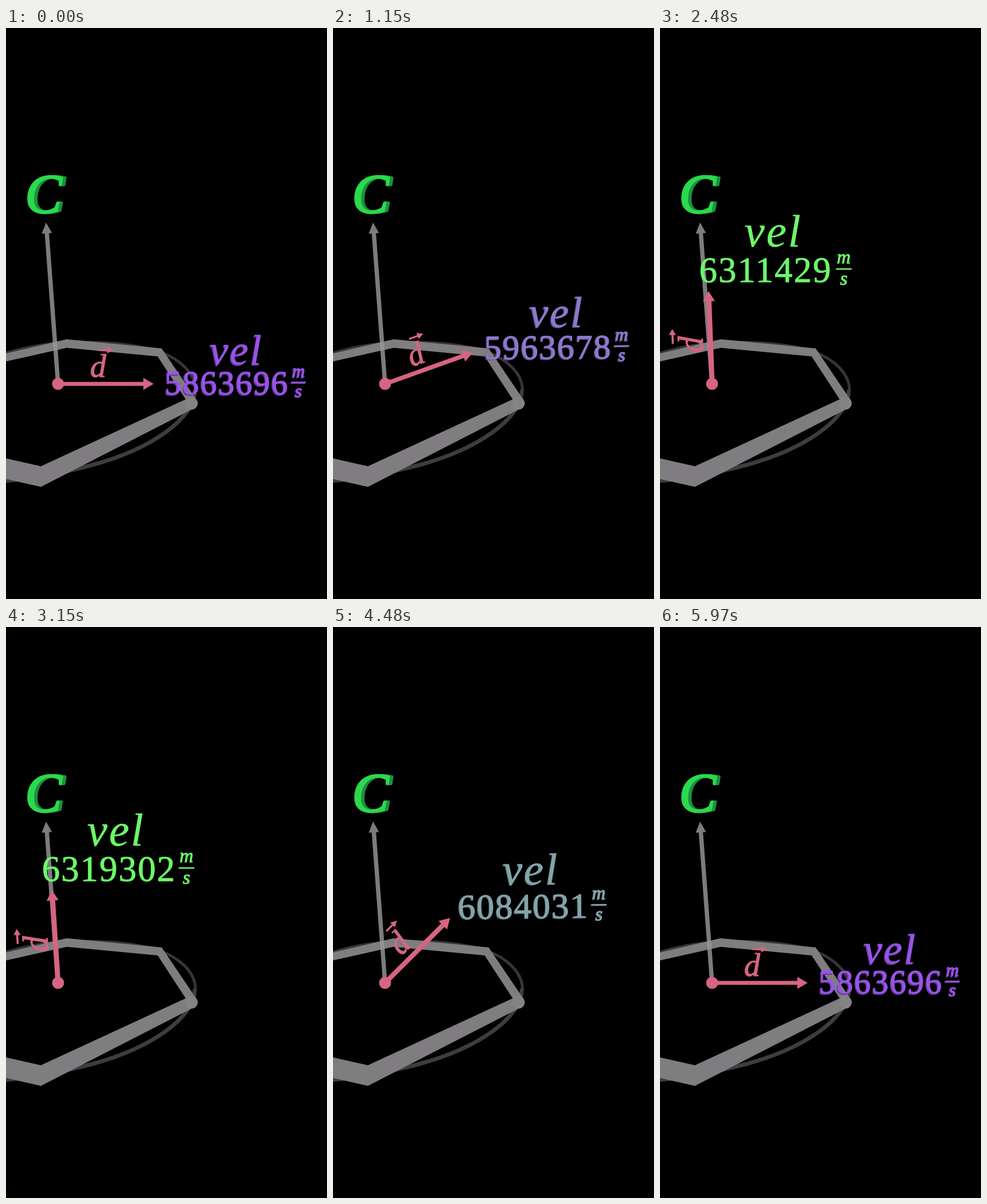
These frames come from a looping animation (561 px wide and 998 px high, 6000 ms). An HTML page with a canvas:

```html
<!DOCTYPE html>
<html lang="en">
<head>
<meta charset="utf-8">
<title>Velocity and direction</title>
<style>
html, body { margin: 0; width: 100%; height: 100%; overflow: hidden; background: #000; }
canvas { display: block; width: 100vw; height: 100vh; }
</style>
</head>
<body>
<canvas id="stage" width="561" height="998"></canvas>
<script>
const ctx = document.getElementById('stage').getContext('2d');
const LOOP = 6000, STEPS = 198;
const O = { x: 91, y: 622 };
const SERIF = '"Liberation Serif", "Times New Roman", serif';
const PINK = '#d56581', GRAY = '#7f7d80';
const PURPLE = [152, 84, 232], GREEN = [108, 250, 104];
const LOW = 5863696, HIGH = 6319726;

// Cubic ease in and out, and its inverse
const ease = p => p < .5 ? 4 * p ** 3 : 1 - 4 * (1 - p) ** 3;
const unease = e => e < .5 ? Math.cbrt(e / 4) : 1 - Math.cbrt((1 - e) / 4);
const mix = (a, b, k) => a + (b - a) * k;

// Step number and speed; progress runs evenly between keys
const keys = [
  [1, LOW], [38, 5963678], [64, 6240111], [98, HIGH],
  [104, 6319302], [130, 6257579], [166, 5919538], [197, LOW]
].map(([n, v]) => [n, unease((v - LOW) / (HIGH - LOW))]);

function progress(n) {
  if (n <= keys[0][0]) return 0;
  for (let i = 1; i < keys.length; i++) {
    const [n0, p0] = keys[i - 1], [n1, p1] = keys[i];
    if (n <= n1) return mix(p0, p1, (n - n0) / (n1 - n0));
  }
  return 0;
}

function poly(points, fill) {
  ctx.beginPath();
  points.forEach(([x, y]) => ctx.lineTo(x, y));
  ctx.closePath();
  ctx.fillStyle = fill;
  ctx.fill();
}

function disc(x, y, r, fill) {
  ctx.beginPath();
  ctx.arc(x, y, r, 0, 7);
  ctx.fillStyle = fill;
  ctx.fill();
}

function text(str, x, y, size, style, weight) {
  ctx.font = `${style} ${size}px ${SERIF}`;
  ctx.lineWidth = weight;
  ctx.lineJoin = 'round';
  ctx.fillText(str, x, y);
  ctx.strokeText(str, x, y);
}

function ink(color) {
  ctx.fillStyle = ctx.strokeStyle = color;
}

function arrow(x0, y0, x1, y1, wide, headLen, headWide, color) {
  const len = Math.hypot(x1 - x0, y1 - y0), neck = len - headLen;
  ctx.save();
  ctx.translate(x0, y0);
  ctx.rotate(Math.atan2(y1 - y0, x1 - x0));
  poly([[0, -wide / 2], [neck, -wide / 2], [neck, -headWide / 2], [len, 0],
    [neck, headWide / 2], [neck, wide / 2], [0, wide / 2]], color);
  ctx.restore();
}

function drawRing() {
  ctx.strokeStyle = '#363537';
  ctx.lineWidth = 5;
  ctx.beginPath();
  ctx.moveTo(-5, 570);
  ctx.bezierCurveTo(30, 559, 60, 553, 106, 550);
  ctx.bezierCurveTo(170, 547, 230, 553, 269, 566);
  ctx.bezierCurveTo(305, 579, 332, 605, 331, 634);
  ctx.stroke();
  ctx.strokeStyle = '#3d3c3e';
  ctx.lineWidth = 7;
  ctx.beginPath();
  ctx.moveTo(330, 632);
  ctx.bezierCurveTo(331, 682, 254, 736, 150, 764);
  ctx.bezierCurveTo(100, 777, 50, 787, -5, 792);
  ctx.stroke();

  poly([[-5, 570], [106, 544], [272, 560], [333, 650], [335, 657], [330, 664],
    [61, 802], [-5, 787], [-5, 751], [61, 766], [314, 649], [265, 574],
    [106, 559], [-5, 584]], GRAY);
  disc(324, 656, 11, '#858386');
}

function drawC() {
  for (let i = 6; i >= 0; i--) {
    ink(i ? '#1c9140' : '#2bd94c');
    text('C', 33 + i, 323, 97, 'italic', 2.5);
  }
}

function drawPointer(sin, cos) {
  const tx = 167 * cos - 11 * sin;
  const ty = -162 * sin - 12 * sin ** 4 * cos;
  arrow(O.x, O.y, O.x + tx, O.y + ty, mix(7, 9, sin), 18, 21, PINK);
  disc(O.x, O.y, 10.5, PINK);

  // The label lies in the plane in which the pointer turns
  ctx.save();
  ctx.transform(tx / 167, ty / 167, 66 / 59 * sin, cos, O.x, O.y);
  ink(PINK);
  text('d', 56, -12, 56, 'italic', 1.2);
  arrow(70, -59, 97, -59, 3.2, 11, 11, PINK);
  ctx.restore();
}

function drawSpeed(speed, e, sin, cos) {
  const em = 62 + 5 * sin;
  const x = O.x + 105.5 + 204.5 * cos + 8 * sin * cos;
  const y = O.y + 19 - 197 * sin + 14 * sin * cos ** 3;
  const color = shade =>
    `rgb(${PURPLE.map((c, i) => Math.round(mix(c, GREEN[i], e) * shade))})`;

  const paint = (fill, dx, dy) => {
    ctx.save();
    ctx.translate(x + dx, y + dy);
    ctx.rotate(-.02 * sin * cos);
    ink(fill);
    ctx.letterSpacing = .03 * em + 'px';
    text(speed, -2 * em, 0, .94 * em, 'normal', .9);
    ctx.letterSpacing = .04 * em + 'px';
    text('vel', -(.74 + .08 * sin) * em, -(.84 + .085 * sin) * em, 1.19 * em, 'italic', .4);
    ctx.letterSpacing = '0px';
    ctx.textAlign = 'center';
    text('m', 1.77 * em, -.49 * em, .5 * em, 'italic', 1);
    text('s', 1.77 * em, .07 * em, .5 * em, 'italic', 1);
    ctx.textAlign = 'left';
    ctx.fillRect(1.565 * em, -.34 * em - 1.2, .41 * em, 2.5);
    ctx.restore();
  };
  const depth = 1.8 * cos;
  if (depth > .3) paint(color(.68), -depth / 2, depth / 2);
  paint(color(1), depth / 3, -depth / 3);
}

function draw(t) {
  const n = Math.min(STEPS - 1, Math.floor((t + 5) / (LOOP / STEPS)));
  const e = ease(progress(n));
  const angle = e * Math.PI / 2;
  const sin = Math.sin(angle), cos = Math.cos(angle);
  ctx.fillStyle = '#000';
  ctx.fillRect(0, 0, 561, 998);
  drawRing();
  arrow(O.x, O.y, 70, 340, 7.5, 19, 18, 'rgba(152,150,153,.82)');
  drawC();
  drawSpeed(String(Math.round(mix(LOW, HIGH, e))), e, sin, cos);
  drawPointer(sin, cos);
}

const start = performance.now();
function tick(now) {
  draw(Math.max(0, now - start) % LOOP);
  requestAnimationFrame(tick);
}
draw(0);
requestAnimationFrame(tick);
</script>
</body>
</html>
```
